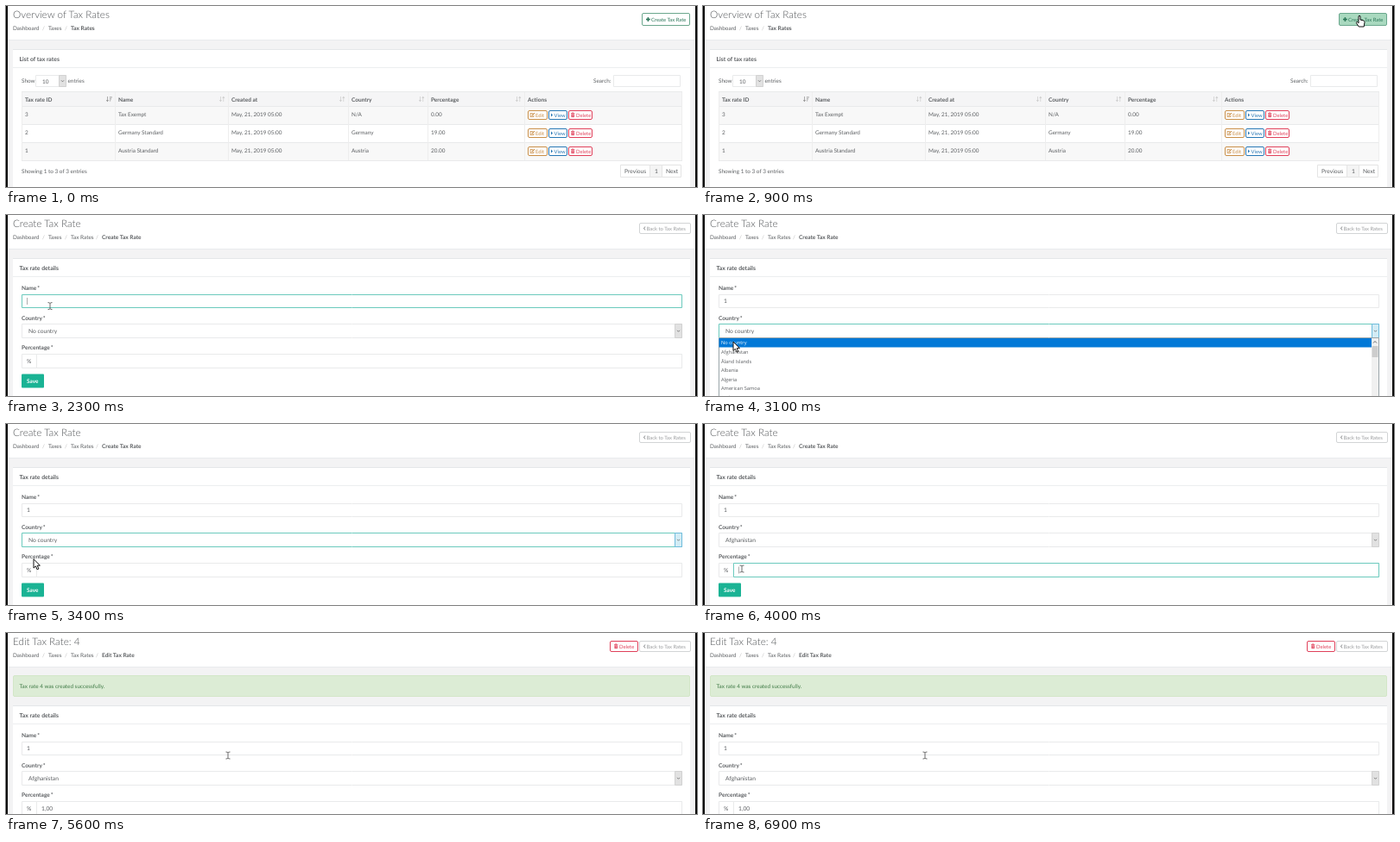
Write an HTML page with a canvas that moves like this. It is 800 px wide and 210 px high and loops after 7100 ms.

```html
<!DOCTYPE html>
<html lang="en">
<head>
<meta charset="utf-8">
<title>Creating a tax rate</title>
<style>
html, body { margin: 0; width: 100%; height: 100%; overflow: hidden; background: #f3f3f4; }
canvas { display: block; }
</style>
</head>
<body>
<canvas width="800" height="210"></canvas>
<script>
const ctx = document.querySelector('canvas').getContext('2d');
const LOOP = 7100, STEP = 100;
const INK = '#5c5f62', LINE = '#e9eaeb', TEAL = '#1ab394', FOCUS = '#6bcabd';
const RED = '#e0405a', GREY = '#9b9d9f';

// Pointer path: time, x, y of the hot spot, shape
const path = [
  [100, 640, 212, 'arrow'], [400, 672, 150, 'arrow'], [700, 757, 15, 'hand'],
  [800, 760, 11, 'hand'], [1100, 760, 11, 'arrow'], [1600, 51, 105.6, 'beam'],
  [2400, 51, 105.6, 'beam'], [2600, 38, 136, 'arrow'], [2800, 36, 137, 'arrow'],
  [3000, 35, 147, 'arrow'], [3100, 35, 147, 'arrow'], [3300, 32, 156.6, 'arrow'],
  [3500, 32, 156.6, 'arrow'], [3800, 45, 168, 'beam'], [4100, 45, 168, 'beam'],
  [4200, 33, 157, 'arrow'], [4300, 34, 190, 'hand'], [4600, 34, 190, 'arrow'],
  [4800, 197, 149.5, 'arrow'], [5000, 257, 142, 'arrow'], [5500, 257, 142, 'beam'],
];

function rect(x, y, w, h, fill, stroke, radius = 0) {
  ctx.beginPath();
  if (stroke) ctx.roundRect(x + .5, y + .5, w - 1, h - 1, radius);
  else ctx.roundRect(x, y, w, h, radius);
  if (fill) { ctx.fillStyle = fill; ctx.fill(); }
  if (stroke) { ctx.strokeStyle = stroke; ctx.lineWidth = 1; ctx.stroke(); }
}

// Text is centred vertically on y
function text(s, x, y, { size = 6.4, weight = 400, color = INK, font = 'Lato' } = {}) {
  ctx.font = `${weight} ${size}px ${font}, sans-serif`;
  ctx.textRendering = 'geometricPrecision';
  ctx.fillStyle = color;
  ctx.fillText(s, x, y + size * .36);
}
const bold = (s, x, y, size = 6.5) => text(s, x, y, { size, weight: 700 });

function poly(points, color, width) {
  ctx.beginPath();
  points.forEach(([x, y]) => ctx.lineTo(x, y));
  if (width) {
    ctx.strokeStyle = color;
    ctx.lineWidth = width;
    ctx.stroke();
  } else {
    ctx.fillStyle = color;
    ctx.fill();
  }
}

const icons = {
  plus(x, y, c) {
    rect(x, y - .8, 4.8, 1.6, c);
    rect(x + 1.6, y - 2.4, 1.6, 4.8, c);
  },
  back: (x, y, c) => poly([[x + 2.2, y - 2], [x + .5, y], [x + 2.2, y + 2]], c, 1.1),
  edit(x, y, c) {
    poly([[x + 3, y - 2], [x, y - 2], [x, y + 2], [x + 4, y + 2], [x + 4, y + .5]], c, .8);
    poly([[x + 1.6, y + .8], [x + 5, y - 2.4]], c, 1.2);
  },
  view: (x, y, c) => poly([[x, y - 2], [x + 2, y], [x, y + 2]], c),
  trash(x, y, c) {
    rect(x, y - 2.2, 4.4, .9, c);
    rect(x + 1.3, y - 3, 1.8, .8, c);
    rect(x + .5, y - 1, 3.4, 3.6, c);
    rect(x + 1.9, y - .5, .6, 2.4, '#fff');
  },
};

function button(x, y, w, h, icon, label, labelX, color, fill = '#fff', border = color) {
  rect(x, y, w, h, fill, border, 1.5);
  icons[icon](x + (h > 11 ? 5 : 3), y + h / 2, color);
  text(label, labelX, y + h / 2, { size: 5.9, color });
}

function selectArrow(x, y, w, h, active) {
  rect(x, y, w, h, active ? '#d3ecf5' : '#e1e1e1', active ? '#6fbcdc' : '#d2d2d2');
  const cx = x + w / 2, cy = y + h / 2;
  poly([[cx - 1.5, cy - .7], [cx, cy + .8], [cx + 1.5, cy - .7]], '#666', .8);
}

function frame(title, crumbs) {
  rect(0, 0, 800, 210, '#f3f3f4');
  rect(0, 0, 800, 39, '#fff');
  rect(0, 39, 800, 1, '#e9ebed');
  text(title, 8, 10.2, { size: 11.7, weight: 300, color: '#505356' });
  const xs = [8, 49, 75, 111];
  crumbs.forEach((crumb, i) => {
    const last = i === crumbs.length - 1;
    text(crumb, xs[i], 25.4, { size: last ? 6.55 : 6.4, weight: last ? 700 : 400 });
    if (!last) text('/', xs[i + 1] - 7, 25.4, { color: '#bbb' });
  });
}

function panel(y, title) {
  rect(8, y, 784, 210, '#fff');
  rect(8, y, 784, 1, '#e4e7e9');
  rect(8, y + 21, 784, 1, '#eceef0');
  bold(title, 15.5, y + 11.5, 6.8);
}

function sortIcon(x, y, active) {
  const c = active ? '#999' : '#d0d0d0';
  rect(x - 2, y - 3, .8, 6, c);
  poly([[x - 3.2, y + 1], [x - 1.6, y + 3.2], [x, y + 1]], c);
  if (active) {
    for (let i = 0; i < 3; i++) rect(x + .8, y - 2.6 + i * 2, 3 - i * .8, 1, c);
  } else {
    rect(x + 1.4, y - 3, .8, 6, c);
    poly([[x + .2, y - 1], [x + 1.8, y - 3.2], [x + 3.4, y - 1]], c);
  }
}

function listPage(t, pointer) {
  frame('Overview of Tax Rates', ['Dashboard', 'Taxes', 'Tax Rates']);
  button(736, 8, 56, 15, 'plus', 'Create Tax Rate', 747, '#2a7558',
    t >= 700 ? '#a9d9bf' : '#fff', '#6ba78d');
  panel(50, 'List of tax rates');

  text('Show', 18, 86.5);
  rect(34, 80, 36, 14, '#fff', LINE);
  text('10', 42, 87.5);
  selectArrow(61, 80, 9, 14);
  text('entries', 71.5, 86.5);
  text('Search:', 680, 86.5);
  rect(703, 80, 78, 14, '#fff', LINE);

  const edges = [18, 126, 257, 396, 488, 600];
  const heads = ['Tax rate ID', 'Name', 'Created at', 'Country', 'Percentage', 'Actions'];
  const rows = [
    ['3', 'Tax Exempt', 'N/A', '0.00'],
    ['2', 'Germany Standard', 'Germany', '19.00'],
    ['1', 'Austria Standard', 'Austria', '20.00'],
  ];
  rect(18, 99, 764, 18, '#f5f5f6');
  heads.forEach((head, i) => {
    bold(head, edges[i] + 4, 108.3);
    if (i < 5) sortIcon(edges[i + 1] - 7, 108, i === 0);
  });
  rows.forEach(([id, name, country, rate], i) => {
    const top = 116 + 21 * i, y = top + 10;
    const hover = pointer && pointer.y >= top && pointer.y < top + 21;
    rect(18, top, 764, 21, hover ? '#f3f3f3' : i % 2 ? '#fff' : '#f8f8f8');
    rect(18, top, 764, 1, LINE);
    [id, name, 'May, 21, 2019 05:00', country, rate]
      .forEach((cell, col) => text(cell, edges[col] + 4, y));
    button(604, top + 5, 23, 11, 'edit', 'Edit', 613, '#c98f48');
    button(628, top + 5, 22, 11, 'view', 'View', 634.5, '#2878b5');
    button(651, top + 5, 28, 11, 'trash', 'Delete', 660, RED);
  });
  edges.concat(782).forEach(x => rect(x, 99, 1, 81, '#eee'));
  rect(18, 99, 765, 1, LINE);
  rect(18, 179, 765, 1, LINE);

  text('Showing 1 to 3 of 3 entries', 18, 192);
  rect(711, 184, 71, 15, '#fff', '#e4e4e4');
  rect(745, 184, 15, 15, '#f4f4f4', '#e4e4e4');
  text('Previous', 716, 191.5, { size: 6.7 });
  text('1', 751, 191.5, { size: 6.7 });
  text('Next', 764, 191.5, { size: 6.7 });
}

function form(top, { name, country, rate, focus }) {
  const border = field => focus === field ? FOCUS : LINE;
  const label = (s, y) => bold(s + '\u2009*', 18, y, 6.6);
  const value = (s, x, y) => text(s, x, y, { size: 6.7 });
  panel(top, 'Tax rate details');
  label('Name', top + 34.2);
  rect(18, top + 42, 765, 16, '#fff', border('name'));
  value(name, 24, top + 50);
  label('Country', top + 69.3);
  rect(18, top + 76, 765, 17, '#fff', border('country'));
  value(country, 26, top + 84.5);
  selectArrow(774, top + 76, 9, 17, focus === 'country');
  label('Percentage', top + 104);
  rect(18, top + 111, 765, 17, '#fff', LINE);
  rect(35, top + 111, 748, 17, '#fff', border('rate'));
  value('%', 24, top + 119.5);
  value(rate, 41, top + 119.5);
}

function dropdown(pointer) {
  const options = ['No country', 'Afghanistan', 'Åland Islands', 'Albania', 'Algeria',
    'American Samoa', 'Andorra'];
  const active = pointer.y < 153.3 ? 0 : 1;
  rect(18, 142, 765, 80, '#fff', '#9aa5aa');
  options.forEach((option, i) => {
    const y = 148 + 10.6 * i;
    if (i === active) rect(18.5, y - 5, 756, 10.6, '#0078d7');
    text(option, 21, y + .3, { size: 5.7, font: 'Open Sans', color: i === active ? '#fff' : INK });
  });
  rect(774, 143, 8, 67, '#f0f0f0');
  poly([[776, 148.5], [778, 146.5], [780, 148.5]], '#555', .9);
  rect(774.5, 152, 7, 13, '#cdcdcd');
}

const backButton = () =>
  button(733, 9, 60, 13, 'back', 'Back to Tax Rates', 741.5, GREY, '#fff', '#d2d4d5');

function createPage(t, pointer) {
  frame('Create Tax Rate', ['Dashboard', 'Taxes', 'Tax Rates', 'Create Tax Rate']);
  backButton();
  const focus = t < 1900 || t >= 4500 ? '' : t < 2600 ? 'name' : t < 3800 ? 'country' : 'rate';
  form(50, {
    name: t >= 2400 ? '1' : '',
    country: t >= 3500 ? 'Afghanistan' : 'No country',
    rate: t >= 4100 ? '1' : '',
    focus,
  });
  if (focus === 'name' && t < 2400) rect(24, 96, .8, 8, '#999');
  if (focus === 'rate' && t < 4100) rect(41, 165.5, .8, 8, '#999');
  rect(18, 184.5, 26, 16, t >= 4600 ? '#68d5bf' : TEAL, null, 1);
  text('Save', 24, 192.7, { size: 6.5, color: '#fff', weight: 700 });
  if (t >= 2700 && t < 3400) dropdown(pointer);
}

function editPage() {
  frame('Edit Tax Rate: 4', ['Dashboard', 'Taxes', 'Tax Rates', 'Edit Tax Rate']);
  button(699, 9, 33, 13, 'trash', 'Delete', 710, RED);
  backButton();
  rect(8, 49, 784, 25, '#dcecd5', '#d3e6c8', 1.5);
  text('Tax rate 4 was created successfully.', 15.5, 61.7, { color: '#3f7a45' });
  form(84, { name: '1', country: 'Afghanistan', rate: '1,00' });
}

function pointerAt(t) {
  const i = path.findLastIndex(key => key[0] <= t);
  if (i < 0) return null;
  const [t0, x0, y0, shape] = path[i];
  const [t1, x1, y1] = path[i + 1] || [LOOP, x0, y0];
  const k = (t - t0) / (t1 - t0);
  return { x: x0 + (x1 - x0) * k, y: y0 + (y1 - y0) * k, shape };
}

const outlines = {
  arrow: 'M0 0V10.5L2.4 8.3 4.1 12.2 5.9 11.4 4.2 7.6H7.4Z',
  hand: 'M-1 .8Q0-.6 1 .8V5L5 6Q6 6.3 6 7.5L5.2 13H-.8L-3.6 8.6Q-3.4 7-2.2 7.6L-1 8.8Z',
  beam: 'M-2.5-4Q0-4 0-3Q0-4 2.5-4M0-3V3M-2.5 4Q0 4 0 3Q0 4 2.5 4',
};

function drawPointer({ x, y, shape }) {
  const outline = new Path2D(outlines[shape]);
  const beam = shape === 'beam';
  ctx.save();
  ctx.translate(x, y);
  ctx.fillStyle = '#fff';
  ctx.strokeStyle = beam ? '#444' : '#111';
  ctx.lineWidth = beam ? .8 : 1;
  if (!beam) ctx.fill(outline);
  ctx.stroke(outline);
  ctx.restore();
}

function draw(now) {
  const t = Math.floor(now % LOOP / STEP) * STEP;
  const pointer = pointerAt(t);
  const page = t < 1100 ? listPage : t < 5500 ? createPage : editPage;
  page(t, pointer);
  rect(0, 0, 2, 210, '#080808');
  rect(798, 0, 2, 210, '#080808');
  if (pointer) drawPointer(pointer);
  requestAnimationFrame(draw);
}
requestAnimationFrame(draw);
</script>
</body>
</html>
```
